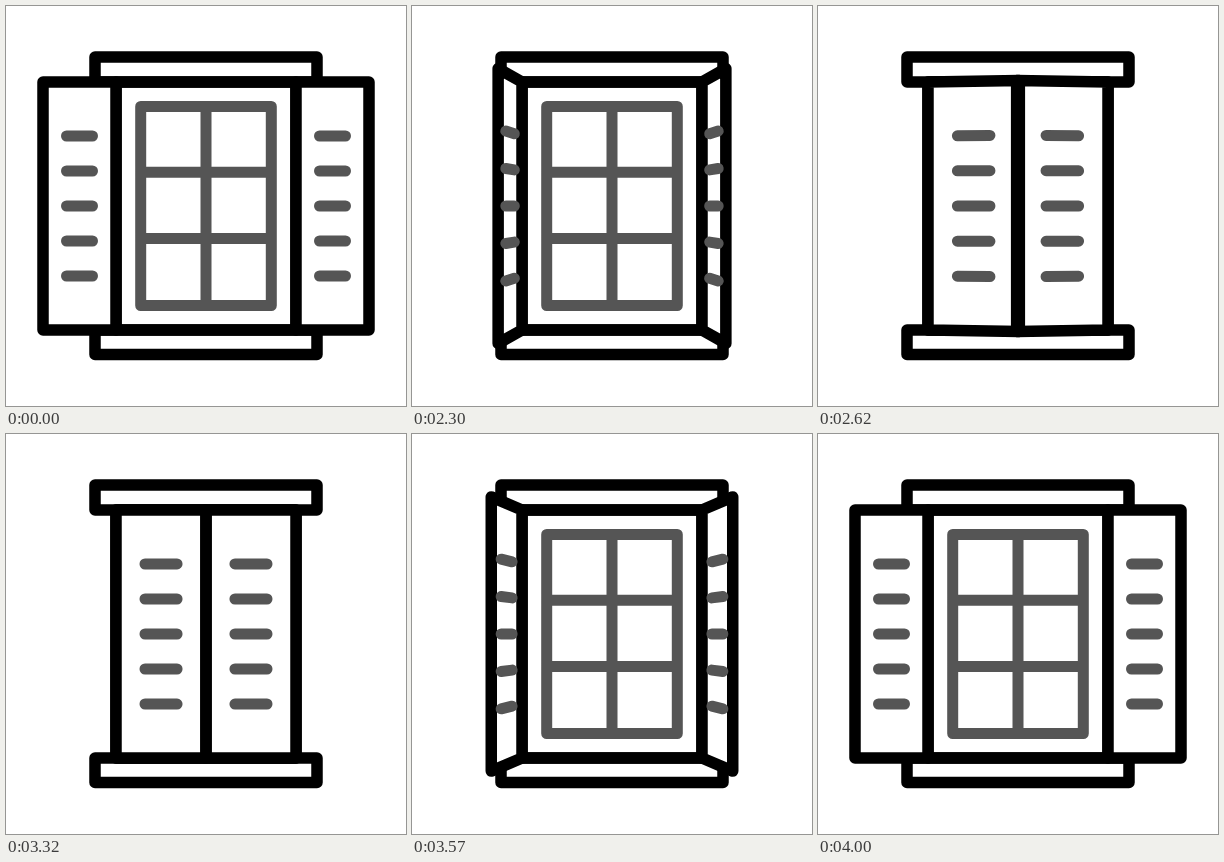
Animation of 400x400 px, one loop 4020 ms. Source, as an HTML page:

```html
<!DOCTYPE html>
<html lang="en">
<head>
<meta charset="utf-8">
<title>Window shutters</title>
<style>
  html, body { margin: 0; width: 100%; height: 100%; overflow: hidden; background: #fff; }
  svg { display: block; width: 100vw; height: 100vh; }
  path { fill: none; stroke: #000; stroke-width: 11.5; stroke-linecap: round; stroke-linejoin: round; }
  .grey { stroke: #555; stroke-width: 11; }
  .cover { fill: #fff; stroke: none; }
</style>
</head>
<body>
<svg viewBox="0 0 400 400">
  <path d="M89 51H311V76H89ZM89 324H311V348.5H89Z"/>
  <path d="M110 76H290V324H110Z"/>
  <path class="grey" d="M134.7 100.5H265.3V299.5H134.7ZM200 100.5V299.5M134.7 166.3H265.3M134.7 232.5H265.3"/>
  <path class="cover" data-part="panel"/>
  <path class="cover" data-part="panel" transform="translate(400) scale(-1 1)"/>
  <path data-part="panel"/>
  <path data-part="panel" transform="translate(400) scale(-1 1)"/>
  <path class="grey" data-part="slots"/>
  <path class="grey" data-part="slots" transform="translate(400) scale(-1 1)"/>
</svg>
<script>
const LOOP = 4020, HINGE = 110, MIDDLE = 200, HALF_HEIGHT = 124;
const OPEN_WIDTH = 73, CLOSED_WIDTH = 90;
const CLOSING = { start: 2000, length: 825, x1: 0.53, x2: 0.17 };
const OPENING = { start: 3300, length: 670, x1: 0.57, x2: 0.1 };
const SLOT_ROWS = [-70, -35, 0, 35, 70];
const SLOT_SPAN = [0.322, 0.678];

// Cubic bezier easing through (x1, 0) and (x2, 1).
function ease(t, { start, length, x1, x2 }) {
  const target = Math.min(1, Math.max(0, (t - start) / length));
  let low = 0, high = 1;
  for (let i = 0; i < 24; i++) {
    const s = (low + high) / 2, r = 1 - s;
    const x = 3 * s * r * r * x1 + 3 * s * s * r * x2 + s * s * s;
    if (x < target) low = s; else high = s;
  }
  const s = (low + high) / 2;
  return s * s * (3 - 2 * s);
}

const point = (x, y) => x.toFixed(2) + " " + y.toFixed(2);

function shapes(closed) {
  const angle = Math.PI * closed;
  const depth = Math.sin(angle);
  const width = OPEN_WIDTH + (CLOSED_WIDTH - OPEN_WIDTH) * closed;
  const reach = -width * Math.cos(angle) / (1 - 0.24 * depth);
  const place = (part, y) =>
    point(HINGE + reach * part, MIDDLE + y / (1 - 0.1 * depth * part));
  const line = points => "M" + points.join("L");
  return {
    panel: line([place(0, -HALF_HEIGHT), place(1, -HALF_HEIGHT),
                 place(1, HALF_HEIGHT), place(0, HALF_HEIGHT)]) + "Z",
    slots: SLOT_ROWS.map(y => line(SLOT_SPAN.map(part => place(part, y)))).join("")
  };
}

const parts = document.querySelectorAll("[data-part]");

function draw(time) {
  const t = time % LOOP;
  const paths = shapes(ease(t, CLOSING) - ease(t, OPENING));
  for (const el of parts) el.setAttribute("d", paths[el.dataset.part]);
}

const began = performance.now();
function tick() {
  draw(performance.now() - began);
  requestAnimationFrame(tick);
}
tick();
</script>
</body>
</html>
```
